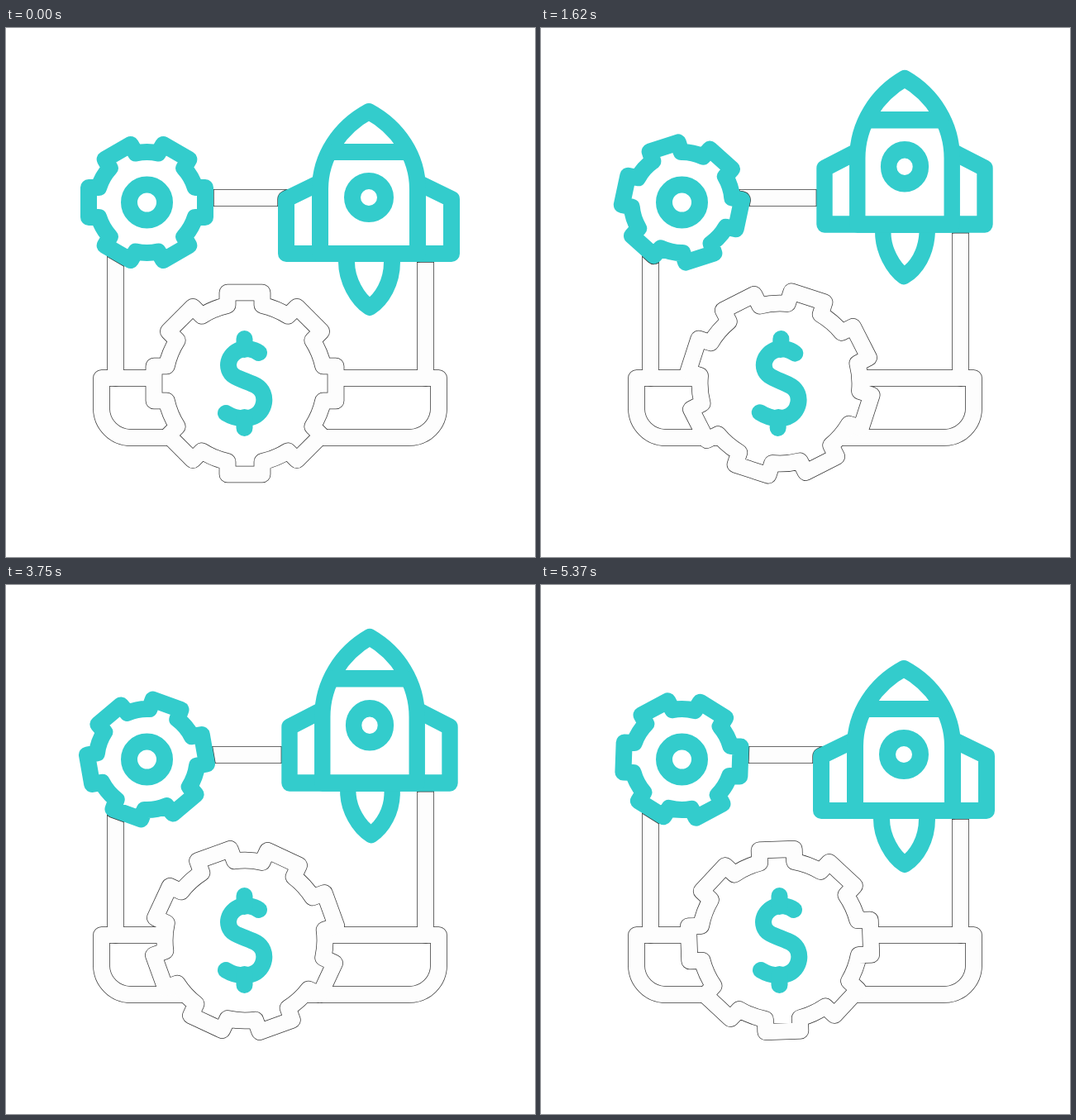
An HTML page that plays this animation: 640 by 640 pixels, repeating every 5400 ms.

```html
<!DOCTYPE html>
<html lang="en">
<head>
<meta charset="utf-8">
<title>Startup launch</title>
<style>
  html, body { margin: 0; width: 100%; height: 100%; overflow: hidden; background: #fff; }
  svg { display: block; width: 100vw; height: 100vh; }
  svg * { stroke-linecap: round; stroke-linejoin: round; }
  .edge { fill: none; stroke: #3a3a3a; stroke-width: 20.7; }
  .face { fill: none; stroke: #fdfdfd; stroke-width: 19.2; }
  .teal { fill: #fff; stroke: #3cc; stroke-width: 20; }
  .halo { fill: none; stroke: #3a3a3a; stroke-width: 21.4; }
  .open { fill: none; }
</style>
</head>
<body>
<svg viewBox="0 0 640 640">
  <defs>
    <clipPath id="outside">
      <path clip-rule="evenodd" d="M0 0H640V640H0Z M185 430a104 104 0 1 0 208 0a104 104 0 1 0 -208 0Z"/>
    </clipPath>
    <clipPath id="frame">
      <path d="M122 195H518V216H122Z M122 195H143V413H122Z M497 195H518V413H497Z"/>
    </clipPath>

    <g id="laptop" clip-path="url(#outside)">
      <path d="M132.500 423.500V205.500H507.500V423.500"/>
      <path d="M115.500 423.500H523.500V460a35.500 35.500 0 0 1 -35.500 35.500H151a35.500 35.500 0 0 1 -35.500 -35.500Z"/>
    </g>

    <path id="bigGear"/>

    <g id="smallGear">
      <path id="cog"/>
      <circle cx="170.500" cy="211" r="21.500"/>
    </g>

    <g id="rocket">
      <path id="flame"/>
      <path d="M380 187L339 207V273H539V207L498 187"/>
      <path d="M380 273V195C380 155 404 120 439 101C474 120 498 155 498 195V273Z"/>
      <path d="M394 150H484"/>
      <circle cx="439" cy="205" r="20"/>
    </g>
  </defs>

  <g class="edge"><use href="#laptop"/><use href="#bigGear"/></g>
  <g class="face"><use href="#laptop"/><use href="#bigGear"/></g>

  <!-- dark rim where the screen frame meets the coloured parts -->
  <g class="halo" clip-path="url(#frame)"><use href="#smallGear"/><use href="#rocket"/></g>

  <g class="teal">
    <use href="#smallGear"/>
    <use href="#rocket"/>
    <g id="dollar" class="open">
      <path d="M306 393C299 388 290 387 284 389C268 394 264 413 276 421C282 425 296 429 303 433C318 442 314 466 297 471C286 474 276 472 266 466"/>
      <path d="M288.500 376V389M288.500 471V484"/>
    </g>
  </g>
</svg>
<script>
  const LOOP = 5400, STEP = 30, TAU = Math.PI * 2;
  const $ = id => document.getElementById(id);
  const set = (id, name, value) => $(id).setAttribute(name, value);

  // Gear centreline: teeth of half-width `half` rising from `rim` to `top`
  function gearPath(cx, cy, teeth, rim, top, half) {
    const root = Math.sqrt(rim * rim - half * half);
    let d = '';
    for (let i = 0; i < teeth; i++) {
      const a = i * TAU / teeth, c = Math.cos(a), s = Math.sin(a);
      const at = (x, y) => (cx + x * c - y * s).toFixed(2) + ' ' + (cy + x * s + y * c).toFixed(2);
      d += (i ? `A${rim} ${rim} 0 0 1 ` : 'M') + at(root, -half);
      d += `L${at(top, -half)}L${at(top, half)}L${at(root, half)}`;
      if (i === teeth - 1) d += `A${rim} ${rim} 0 0 1 ${cx + root} ${cy - half}Z`;
    }
    return d;
  }

  // Progress from 0 to 1 between times a and b, and two easings of it
  const part = (t, a, b) => Math.min(1, Math.max(0, (t - a) / (b - a)));
  const smooth = u => u * u * (3 - 2 * u);
  const easeOut = u => 1 - (1 - u) ** 5;

  const wave = (t, period, peak) => Math.cos((t - peak) / period * TAU);

  function flamePath(bend, length) {
    const y = k => 283 + length * k;
    return `M412 273V283C412 ${y(.4)} ${425 + bend * .35} ${y(.82 + bend * .005)} ${440 + bend} ${y(1)}` +
      `C${455 + bend * .25} ${y(.82)} ${467 + bend * .6} ${y(.45)} 467 283V273Z`;
  }

  function draw(t) {
    const turn = t / LOOP * 360;
    set('bigGear', 'transform', `rotate(${turn} 289 430)`);
    set('cog', 'transform', `rotate(${-turn} 170.5 211)`);

    const tilt = t < 1620 ? t / 1620 : 1 - part(t, 1620, 2700);
    set('dollar', 'transform', `rotate(${2 * tilt} 288.5 430)`);

    const crouch = smooth(part(t, 0, 720)) - smooth(part(t, 720, 960));
    const hover = easeOut(part(t, 780, 1800)) - smooth(part(t, 4260, 4680));
    const dy = 35 * crouch + hover * (7 * wave(t, 215, 3742) - 40);
    const sx = 1 - .03 * hover;
    const sy = 1 - .052 * crouch + .026 * hover;
    set('rocket', 'transform',
      `translate(${439 + hover} ${283 + dy}) scale(${sx} ${sy}) translate(-439 -283)`);
    set('flame', 'd', flamePath(hover * (4 + 12 * wave(t, 720, 2820)), 55 - 4 * hover));
  }

  set('bigGear', 'd', gearPath(289, 430, 8, 97, 110, 21));
  set('cog', 'd', gearPath(170.5, 211, 6, 61, 70.5, 18));

  const start = performance.now();
  function tick() {
    const t = (performance.now() - start) % LOOP;
    draw(Math.floor(t / STEP) * STEP);
    requestAnimationFrame(tick);
  }
  tick();
</script>
</body>
</html>
```
